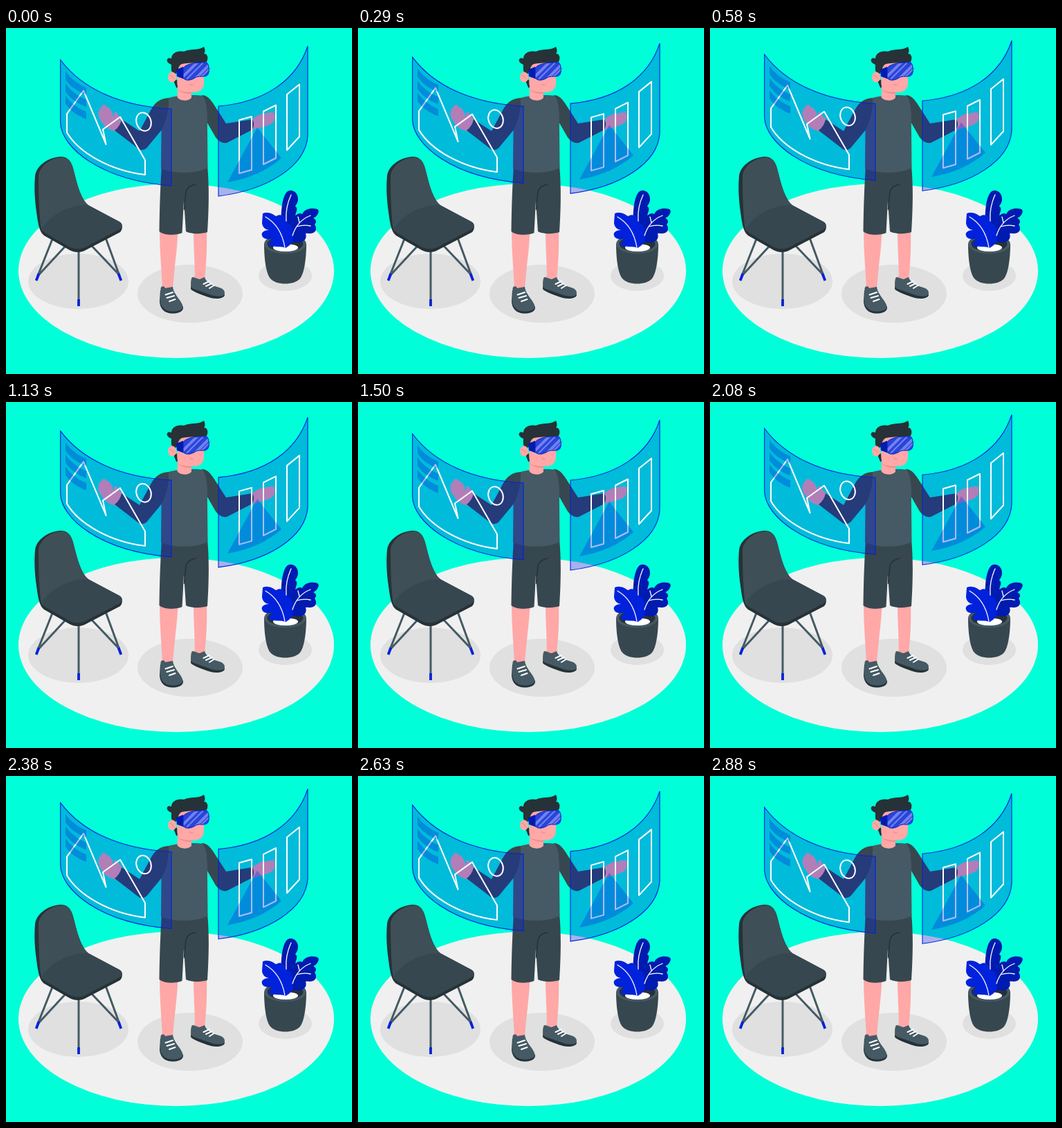
Recreate the animation shown at these times as an HTML page. Size 500 by 500 pixels, loop 2930 ms.

```html
<!DOCTYPE html>
<html lang="en">
<head>
<meta charset="utf-8">
<title>Floating screens</title>
<style>
  html, body { margin: 0; width: 100%; height: 100%; overflow: hidden; background: #00ffd8; }
  svg { display: block; width: 100vw; height: 100vh; }
  .skin { fill: #ffa8a7; }
  .dark { fill: #263238; }
  .slate { fill: #37474f; }
  .grey { fill: #455a64; }
  .blue { fill: #0022dc; }
  .navy { fill: #001bb0; }
  .line { fill: none; stroke-linecap: round; stroke-linejoin: round; }
  .white { stroke: #fff; }
  .glass { fill: #001edc; fill-opacity: .3; stroke: #0022dc; stroke-width: 1.1; }
  .tint { fill: #001edc; fill-opacity: .3; }
</style>
</head>
<body>
<svg viewBox="0 0 500 500">
  <defs>
    <clipPath id="visorClip">
      <path id="visor" d="M256 58C260 51 280 49 290 50C294 53 294 63 292 67C289 71 283 70 279 70C274 70 272 74 266 75C260 76 256 74 256 70Z"/>
    </clipPath>
    <path id="band" d="M86 62.500C93 73 104 81 116 86V96.500C104 92 93 85 86 74.500Z"/>
  </defs>

  <!-- floor -->
  <ellipse cx="246" cy="351" rx="228" ry="126" fill="#f0f0f0"/>
  <g fill="#e0e0e0">
    <ellipse cx="104.500" cy="366" rx="72.500" ry="40"/>
    <ellipse cx="266" cy="384" rx="76" ry="42"/>
    <ellipse cx="403.500" cy="358" rx="38.500" ry="22"/>
  </g>

  <!-- chair -->
  <g class="line">
    <path stroke="#455a64" stroke-width="3" d="M67 305L46 358M86 315L48 356M145 306L164 358M125 316L162 355M105 320V394"/>
    <path stroke="#0022dc" stroke-width="3.800" stroke-linecap="butt" d="M47.500 355L43.700 365M162.500 355L166.300 365M105 392V402"/>
  </g>
  <path class="dark" d="M42 214C44 199 60 188 77 186C88 185 94 191 97 203C102 222 107 246 119 256L164 280C169 283 169 291 165 295L117 320C109 325 100 325 92 321L57 301C47 296 46 279 43 258C41 240 41 227 42 214Z"/>
  <path fill="#3e4f57" d="M47 214C48 201 62 189 78 187C88 186 94 191 97 203C102 222 107 246 119 256L120 262L52 293C48 285 47 235 47 214Z"/>
  <path class="slate" d="M51 291C62 272 88 256 118 256L164 280C169 283 169 288 164 291L116 316C109 320 100 320 93 317L58 297Q54 295 51 291Z"/>

  <!-- plant -->
  <path class="slate" d="M373 312C373 334 376 355 382 362C390 372 417 372 425 362C431 355 434 333 434 312Z"/>
  <ellipse class="grey" cx="403.500" cy="312" rx="30.500" ry="14"/>
  <ellipse class="dark" cx="403.500" cy="312" rx="26" ry="11"/>
  <ellipse cx="404" cy="317.500" rx="18" ry="5.500" fill="#fff"/>
  <path class="navy" d="M404 314C406 296 409 280 416 273C420 268 426 267 428 269C431 262 439 260 446 261C451 261 453 264 451 268C449 272 446 274 444 275C449 277 449 281 446 284C449 288 449 294 444 296C438 298 435 296 433 297C435 303 432 308 427 309C418 312 412 306 404 314Z"/>
  <path class="navy" d="M398 285C397 270 398 243 407 236C414 232 422 238 422 247C422 253 419 255 418 258C421 259 421 263 419 267L414 295Z"/>
  <path class="blue" d="M371 268C378 265 385 268 390 272C398 267 405 273 407 282C414 284 416 294 413 300C417 306 413 313 404 318C399 315 390 317 381 315C378 311 383 307 387 305C380 306 371 305 370 300C368 295 374 292 380 292C374 291 370 287 370 281Z"/>
  <g class="line white" stroke-width="1.300">
    <path d="M375 273C389 281 399 294 403 317M412 241C406 254 404 267 405 279M440 271C427 276 418 287 414 300M424 281L422 273M420 287Q430 284 440 286"/>
  </g>

  <!-- legs and shoes -->
  <path class="skin" d="M222 290H248.500C248 318 243 346 241 378L226 379C225 350 222 325 222 290ZM271 290H290C291 320 289 345 287 364L273 366C273 335 271 320 271 290Z"/>
  <path class="dark" d="M223 379L222 396C223 406 229 412 239 412.500C248 413 257 410 256 403L240 390ZM268 364L267 377C268 380 280 385 296 390C304 392 315 391 316 386L314 380Z"/>
  <path class="grey" d="M223.500 376C225 372 229 373 230 376L241 374C242 385 254 394 255.500 402C256 408 247 410 239 409.500C229 409 223 402 223 394ZM268 362C270 357 275 363 280 363L287 360C289 367 297 372 308 375C315 377 317 381 315.500 385C313 389 303 388 297 386L271 377C266 375 267 366 268 362Z"/>
  <path class="line white" stroke-width="2" d="M230.500 385.500L241 382M232.500 390L243 387M236 395L244.500 392M285.500 370L294 366M289 373L297.500 369M294 376L300.500 372"/>

  <!-- shorts -->
  <path class="slate" d="M225 198H291C294 230 293 265 291 295C282 298 267 298 260 294L257 250L254.500 296C246 300 229 300 221.500 294C222 260 223 230 225 198Z"/>
  <path class="line" stroke="#263238" stroke-width="1.500" d="M274 226C264 228 260 232 259.500 241L257.500 262"/>

  <!-- arms -->
  <path class="skin" d="M160 150C149 148 141 142 138 135C133 130 132 121 136 116L139 112.500C141 110 144 111 145.500 114C149 114 151 118 153 121C155 124 154 127 156 129C156 124 157 121 159 121C161 123 162 127 165 129L170 134Z"/>
  <path class="skin" d="M355 133C362 127 367 124 373 124C379 122 386 121 388 123C389 130 388 135 384 138C377 142 367 144 356 147Z"/>
  <path class="slate" d="M238 101C222 101 215 108 209 119L193 149L167 132Q165 142 157 148L192 175C197 178 203 175 206 170L226 146L238 128Z"/>
  <path class="slate" d="M283 97C291 97 296 104 300 110L318 138L356 132Q360 139 356 147L319 166C312 167 307 163 303 158L288 132Z"/>

  <!-- torso -->
  <path class="grey" d="M235 101C248 97 274 96 284 98C292 107 291 130 291 150L291.500 202C276 211 240 211 224 203L224.500 148C232 134 236 118 235 101Z"/>

  <!-- head -->
  <path class="dark" d="M242 76L250 74V87L246 86Z"/>
  <path class="skin" d="M248 76L268 88V101C264 106 251 106 247.500 100Z"/>
  <path class="skin" d="M246 50H286V80C286 88 280 93 272 93C262 93 251 90 247.500 82Z"/>
  <path fill="#f28f8f" d="M249 90Q258 93 268 93V95Q257 96 249 90Z"/>
  <path class="dark" d="M241 65C238 62 239 56 239 53C233 51 231 46 234 44C235 43 238 44 239 44C239 36 249 32 257 34C268 29 278 33 286 27C288 31 288 35 286 37C291 37 293 43 290 49C281 52 266 49 254 52C249 54 249 60 246 66Z"/>
  <ellipse class="skin" cx="240" cy="71" rx="6" ry="7.500"/>
  <path class="line" stroke="#e58383" stroke-width="1" d="M265 81Q267 83 270 82.500M237 69Q241 68 242 73"/>
  <path class="navy" d="M246 60L256 56L258 74L247 70Z"/>
  <use href="#visor" fill="#2a44dc"/>
  <g clip-path="url(#visorClip)" stroke="#7182ec">
    <path stroke-width="4" d="M254 72L278 48M271 76L293 54"/>
    <path stroke-width="2" d="M261 74L285 50M277 76L297 56"/>
  </g>
  <use href="#visor" fill="none" stroke="#0022c8" stroke-width="1"/>

  <!-- floating screens, drawn at their lowest point -->
  <g id="screens">
    <path class="glass" d="M78.700 46C110 88 165 113 239 117V228C135 220 80 172 78.700 137Z"/>
    <g class="line white" stroke-width="2">
      <path d="M88 124L112 90.500L144.500 168L140 146.500L165 128.500L201 191V212C150 206 105 180 88 151Z"/>
      <ellipse cx="199" cy="135.500" rx="10.500" ry="13.500" transform="rotate(-18 199 135.500)"/>
    </g>
    <g class="tint">
      <use href="#band"/>
      <use href="#band" y="17.500"/>
      <use href="#band" y="35"/>
    </g>

    <path class="glass" d="M436 26C420 75 375 107 307 113V243C378 234 433 200 436 156Z"/>
    <path class="line white" stroke-width="2" d="M337 133L355 128V205L337 210ZM372 120.500L390 111.500V188L372 197ZM406 96L424 81.500V157L406 176.500Z"/>
    <path class="tint" d="M363 144L398 188C378 206 350 218 320 223Z"/>
  </g>
</svg>
<script>
  const LOOP = 2930, PERIOD = 1500, LEAD = 30, RISE = 10, REST = 0.4;
  const screens = document.getElementById('screens');
  const start = performance.now();

  // Linear rise for half a period, then linear fall.
  function lift(ms) {
    const phase = ((ms + LEAD) % PERIOD) / PERIOD;
    return RISE * (1 - Math.abs(1 - 2 * phase));
  }

  function draw(now) {
    const ms = Math.max(0, now - start) % LOOP;
    screens.setAttribute('transform', `translate(0 ${(REST - lift(ms)).toFixed(2)})`);
    requestAnimationFrame(draw);
  }
  draw(start);
</script>
</body>
</html>
```
